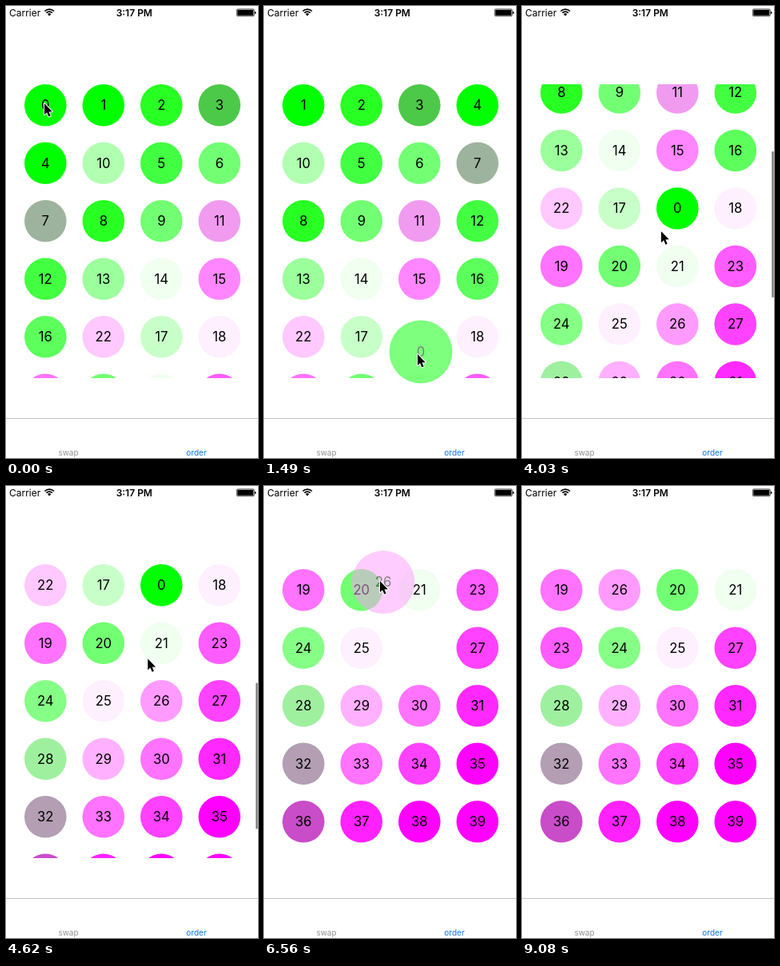
Animation, 315 px wide and 566 px high, one loop 9410 ms. Source, as an HTML page with a canvas:

```html
<!DOCTYPE html>
<html lang="en">
<head>
<meta charset="utf-8">
<title>Reorderable grid</title>
<style>
  html, body { margin: 0; width: 100%; height: 100%; overflow: hidden; background: #fff; }
  canvas { display: block; width: 315px; height: 566px; }
</style>
</head>
<body>
<canvas id="stage"></canvas>
<script>
const W = 315, H = 566, LOOP = 9410, TICK = 148.8;
const RADIUS = 26.3, PITCH = 72.5, LEFT = 49.3, TOP = 124.3;
const VIEW = { top: 98, bottom: 466 };
const FONT = 'Inter, "Open Sans", sans-serif';
const dpr = window.devicePixelRatio || 1;

const COLORS = (
  '00ff00 00ff00 28ff22 4cc948 00ff00 42ff42 73ff73 9eb39e 28ff22 73ff73 ' +
  'b1ffb1 f09bf0 42ff42 9bff9b f0fff0 ff86ff 5cff5c c8ffc8 fef0fe ff73ff ' +
  '73ff73 f0fff0 ffc8ff ff5cff 86ff86 fef0fe ff9bff ff42ff 9ef09e ffb1ff ' +
  'ff73ff ff28ff b39eb3 ff73ff ff42ff ff00ff c94cc9 ff22ff ff00ff ff00ff'
).split(' ').map(c => '#' + c);

// Items in numeric order, except 10 and 22, which sit earlier
const START = COLORS.map((_, i) => i);
function move(list, item, to) {
  list.splice(list.indexOf(item), 1);
  list.splice(to, 0, item);
}
move(START, 10, 5);
move(START, 22, 17);

const MOVES = [
  { at: 430, item: 0, to: 5 },
  { at: 620, item: 0, to: 10 },
  { at: 830, item: 0, to: 14 },
  { at: 1130, item: 0, to: 18 },
  { at: 6640, item: 26, to: 21 }
];
const MOVE_TIME = 320;

const DRAGS = [
  { item: 0, lift: 275, drop: 2220, dx: 4, dy: -3 },
  { item: 26, lift: 5700, drop: 7450, dx: 4, dy: 1.5 }
];

// [time, x, y]
const POINTER = [
  [0, 48, 122], [260, 48, 122], [440, 70, 158], [590, 95, 208], [740, 128, 272],
  [900, 160, 342], [1050, 181, 404], [1185, 191, 434], [1488, 192, 436],
  [1800, 188, 446], [2100, 179, 457], [2220, 179, 453.5], [3480, 179, 453.5],
  [3720, 177, 405], [3870, 175, 345], [4018, 174, 282], [4180, 174, 235],
  [4400, 175, 216], [4900, 182, 217], [5208, 190, 219], [5600, 190, 204],
  [5900, 189, 199], [6250, 168, 152], [6547, 145, 119], [6696, 136, 116.5],
  [7000, 125, 112.5], [7290, 120.5, 112], [8060, 120.5, 112], [8330, 190, 330],
  [8620, 256, 538.5], [8790, 256, 538.5], [8928, 266, 551], [9070, 276, 570]
];

// [time, offset]
const SCROLL = [
  [3480, 0], [3720, 40], [3870, 98], [4018, 161], [4180, 208], [4400, 256],
  [4620, 291], [4900, 325], [5208, 346.5], [5500, 354.5], [5900, 356.5]
];

const clamp = v => Math.max(0, Math.min(1, v));
const lerp = (a, b, p) => a + (b - a) * p;
const ease = p => { p = clamp(p); return p * p * (3 - 2 * p); };

// Monotone cubic through the keys, so nothing overshoots
function track(keys, t, col) {
  const n = keys.length - 1;
  if (t <= keys[0][0]) return keys[0][col];
  if (t >= keys[n][0]) return keys[n][col];
  let i = 0;
  while (keys[i + 1][0] <= t) i++;
  const slope = k => (keys[k + 1][col] - keys[k][col]) / (keys[k + 1][0] - keys[k][0]);
  const tangent = k => {
    if (k === 0 || k === n) return 0;
    const a = slope(k - 1), b = slope(k);
    return a * b <= 0 ? 0 : 2 * a * b / (a + b);
  };
  const span = keys[i + 1][0] - keys[i][0], p = (t - keys[i][0]) / span;
  const base = lerp(keys[i][col], keys[i + 1][col], p * p * (3 - 2 * p));
  return base + span * p * (1 - p) * ((1 - p) * tangent(i) - p * tangent(i + 1));
}

function makeLayer(canvas) {
  canvas.width = Math.round(W * dpr);
  canvas.height = Math.round(H * dpr);
  const c = canvas.getContext('2d');
  c.scale(dpr, dpr);
  return c;
}
const ctx = makeLayer(document.getElementById('stage'));
const lifted = makeLayer(document.createElement('canvas'));

const slot = i => ({ x: LEFT + (i % 4) * PITCH, y: TOP + Math.floor(i / 4) * PITCH });

function layout(t) {
  const order = START.slice(), pos = [];
  order.forEach((item, i) => { pos[item] = slot(i); });
  for (const m of MOVES) {
    if (t <= m.at) break;
    move(order, m.item, m.to);
    const p = ease((t - m.at) / MOVE_TIME);
    order.forEach((item, i) => {
      const to = slot(i), from = pos[item];
      pos[item] = { x: lerp(from.x, to.x, p), y: lerp(from.y, to.y, p) };
    });
  }
  return pos;
}

function text(c, str, x, y, size, color, weight = 400, align = 'center') {
  c.font = `${weight} ${size}px ${FONT}`;
  c.textAlign = align;
  c.fillStyle = color;
  c.fillText(str, x, y);
}

function disc(c, item, x, y, r) {
  c.fillStyle = COLORS[item];
  c.beginPath();
  c.arc(x, y, r, 0, Math.PI * 2);
  c.fill();
  text(c, String(item), x, y + 6, 16.7, '#000');
}

function liftAmount(d, t) {
  if (t < d.lift) return 0;
  if (t < d.drop) return ease((t - d.lift) / 200);
  return Math.pow(1 - clamp((t - d.drop) / 280), 1.5);
}

function drawCells(t) {
  const offset = track(SCROLL, t, 1), pos = layout(t);
  const drag = DRAGS.find(d => liftAmount(d, t) > 0);
  ctx.save();
  ctx.beginPath();
  ctx.rect(0, VIEW.top, W, VIEW.bottom - VIEW.top);
  ctx.clip();
  pos.forEach((p, item) => {
    if (!drag || drag.item !== item) disc(ctx, item, p.x, p.y - offset, RADIUS);
  });
  ctx.restore();
  drawScrollbar(t, offset);
  if (drag) drawLifted(drag, t, pos[drag.item], offset);
}

function drawLifted(drag, t, home, offset) {
  const p = liftAmount(drag, t);
  const x = lerp(home.x, track(POINTER, t, 1) + drag.dx, p);
  const y = lerp(home.y - offset, track(POINTER, t, 2) + drag.dy, p);
  lifted.clearRect(0, 0, W, H);
  disc(lifted, drag.item, x, y, RADIUS * (1 + p / 2));
  ctx.globalAlpha = 1 - p / 2;
  ctx.drawImage(lifted.canvas, 0, 0, W, H);
  ctx.globalAlpha = 1;
}

function drawScrollbar(t, offset) {
  const alpha = clamp((t - 3480) / 100) * (1 - clamp((t - 5700) / 300));
  if (!alpha) return;
  ctx.fillStyle = `rgba(0,0,0,${0.5 * alpha})`;
  ctx.beginPath();
  ctx.roundRect(312.2, 101.5 + offset / 2, 2.5, 183, 1.2);
  ctx.fill();
}

function drawStatusBar() {
  text(ctx, 'Carrier', 4, 12.7, 12, '#000', 400, 'left');
  text(ctx, '3:17 PM', 160.3, 12.7, 12, '#000', 600);

  ctx.strokeStyle = ctx.fillStyle = '#000';
  ctx.lineWidth = 1.7;
  for (const r of [5.2, 8.2]) {
    ctx.beginPath();
    ctx.arc(54.2, 12.3, r, -Math.PI * 0.75, -Math.PI * 0.25);
    ctx.stroke();
  }
  ctx.beginPath();
  ctx.moveTo(54.2, 12.6);
  ctx.arc(54.2, 12.3, 3, -Math.PI * 0.75, -Math.PI * 0.25);
  ctx.fill();

  ctx.lineWidth = 0.7;
  ctx.beginPath();
  ctx.roundRect(288.4, 3.9, 21.8, 8.8, 1.3);
  ctx.stroke();
  ctx.fillRect(289.3, 4.8, 20, 7);
  ctx.beginPath();
  ctx.arc(310.9, 8.3, 1.6, -Math.PI / 2, Math.PI / 2);
  ctx.fill();
}

function drawTabs() {
  ctx.fillStyle = '#c4c4c4';
  ctx.fillRect(0, 516, W, 1);
  text(ctx, 'swap', 78, 562.5, 10, '#929292');
  text(ctx, 'order', 238, 562.5, 10, '#1275e6');
}

function drawPointer(t) {
  if (t >= 9060) return;
  const shape = [[0, 0], [0, 14], [3.1, 11.2], [5.4, 16.6], [7.7, 15.6], [5.5, 10.4], [9.8, 10.2]];
  ctx.save();
  ctx.translate(track(POINTER, t, 1), track(POINTER, t, 2));
  ctx.beginPath();
  shape.forEach(([x, y]) => ctx.lineTo(x, y));
  ctx.closePath();
  ctx.lineJoin = 'round';
  ctx.lineWidth = 2;
  ctx.strokeStyle = '#fff';
  ctx.stroke();
  ctx.fillStyle = '#000';
  ctx.fill();
  ctx.restore();
}

function draw(t) {
  ctx.fillStyle = '#fff';
  ctx.fillRect(0, 0, W, H);
  drawStatusBar();
  drawTabs();
  drawCells(t);
  drawPointer(t);
}

const begin = performance.now();
function frame() {
  const t = (performance.now() - begin) % LOOP;
  draw(Math.floor(t / TICK) * TICK);
  requestAnimationFrame(frame);
}
frame();
</script>
</body>
</html>
```
